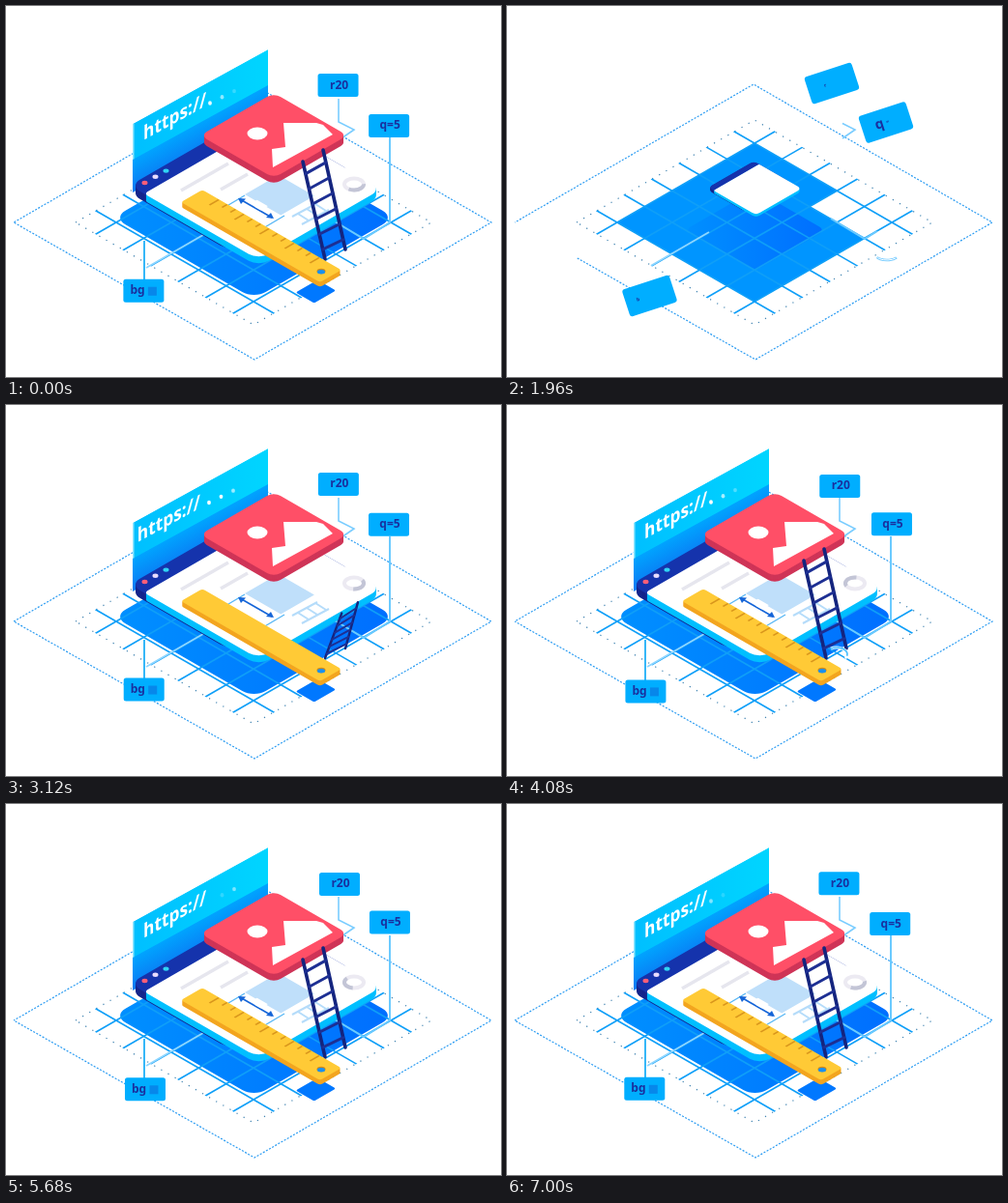
Animation, 512 px wide and 384 px high, one loop 7.04 s. Source, as an HTML page with a canvas:

```html
<!DOCTYPE html>
<html>
<head>
<meta charset="utf-8">
<style>
html, body { margin: 0; width: 100%; height: 100%; overflow: hidden; background: #fff; }
canvas { display: block; }
</style>
</head>
<body>
<canvas id="stage" width="512" height="384"></canvas>
<script>
const c = document.getElementById('stage').getContext('2d');
const LOOP = 7040, RESTART = 1400, SWAY = 2020, BLINK = 990;
const NAVY = '#1a2f9e', SKY = '#00aeff';
const FONT = '"Noto Sans", "Open Sans", sans-serif';

const clamp = x => Math.max(0, Math.min(1, x));
const lin = (t, a, b) => clamp((t - a) / (b - a));
const ease = (t, a, b) => { const p = lin(t, a, b); return p * p * (3 - 2 * p); };
const out = (t, a, b) => 1 - (1 - lin(t, a, b)) ** 3;
const mix = (a, b, p) => a + (b - a) * p;
const mixPt = (a, b, p) => [mix(a[0], b[0], p), mix(a[1], b[1], p)];

function scoped(draw) { c.save(); draw(); c.restore(); }

// Isometric floor: first axis runs down-right, second up-right.
function floor(x, y, draw) {
  scoped(() => { c.transform(.866, .5, .866, -.5, x, y); draw(); });
}

function box(x, y, w, h, r, fill) {
  c.fillStyle = fill;
  c.beginPath();
  c.roundRect(x, y, w, h, r);
  c.fill();
}

function slab(x, y, u, v, w, h, r, depth, side, top) {
  for (let d = depth; d >= 0; d--)
    floor(x, y + d, () => box(u, v, w, h, r, d ? side : top));
}

function trace(pts, close) {
  c.beginPath();
  pts.forEach(p => c.lineTo(...p));
  if (close) c.closePath();
}

function poly(pts, fill) {
  trace(pts, true);
  c.fillStyle = fill;
  c.fill();
}

// Strokes the first part p of a path.
function line(pts, color, width = 1.5, p = 1) {
  if (p <= 0) return;
  let len = 0;
  for (let i = 1; i < pts.length; i++)
    len += Math.hypot(pts[i][0] - pts[i - 1][0], pts[i][1] - pts[i - 1][1]);
  scoped(() => {
    if (p < 1) c.setLineDash([p * len, len + 1]);
    c.strokeStyle = color;
    c.lineWidth = width;
    trace(pts);
    c.stroke();
  });
}

function ellipse(x, y, rx, ry, fill) {
  c.fillStyle = fill;
  c.beginPath();
  c.ellipse(x, y, rx, ry, 0, 0, 7);
  c.fill();
}

function arc(x, y, rx, ry, from, to, color, width) {
  c.strokeStyle = color;
  c.lineWidth = width;
  c.beginPath();
  c.ellipse(x, y, rx, ry, 0, from, to);
  c.stroke();
}

function border(u) {
  const p = lin(u, 0, 600);
  if (!p) return;
  scoped(() => {
    const pts = [[8, 224], [255, 81], [502, 224], [257, 366], [8, 224]];
    const n = Math.min(4, Math.ceil(p * 4));
    const path = pts.slice(0, n);
    path.push(mixPt(pts[n - 1], pts[n], p * 4 - n + 1));
    c.setLineDash([2, 1.6]);
    c.lineDashOffset = -u / 60;
    c.strokeStyle = '#2b9cf2';
    c.lineWidth = 1.2;
    trace(path);
    c.stroke();
    if (p > .5) {
      c.setLineDash([1.2, 7]);
      c.lineDashOffset = 0;
      c.strokeStyle = '#3a7fae';
      trace([[72, 224], [256, 118], [440, 224], [256, 330]], true);
      c.stroke();
    }
  });
}

function grid(u) {
  const p = out(u, 40, 400), cell = 32.8;
  const fade = 1 - ease(u, 700, 1150);
  floor(114, 224, () => {
    c.globalAlpha = fade;
    c.fillStyle = '#0095ff';
    c.fillRect(0, 0, 3 * cell * p, 5 * cell * p);
    c.fillRect(3 * cell * p - 1, 0, 2 * cell * p + 1, 4 * cell * p);
    c.globalAlpha = 1;
  });
  // The shadow below the page spreads with it.
  const k = mix(.2, .5, out(u, 320, 560)) + .5 * ease(u, 560, 950);
  if (u > 320) {
    const s = 168 * k;
    const g = c.createLinearGradient(-s / 2, -s / 2, s / 2, s / 2);
    g.addColorStop(0, '#0090ff');
    g.addColorStop(1, '#006eff');
    floor(256.5, mix(232, 219, ease(u, 560, 950)), () => box(-s / 2, -s / 2, s, s, 14 * k, g));
  }
  floor(114, 224, () => {
    c.strokeStyle = '#0f9ff8';
    c.lineWidth = 1.9;
    const a = -.75 * cell, b = mix(a, 5.75 * cell, p);
    for (let i = 0; i < 6; i++) {
      trace([[i * cell, a], [i * cell, b]]);
      c.stroke();
      trace([[a, i * cell], [b, i * cell]]);
      c.stroke();
    }
  });
}

function connectors(u) {
  const p = lin(u, 350, 750), pale = '#8ed6ff';
  line([[209, 234], [145, 271]], pale, 1.8, out(u, 350, 700));
  line([[143, 243], [143, 285]], '#35b7f8', 2, lin(u, 650, 800));
  line([[335, 220], [370, 241], [397, 224], [397, 136]], '#6bcaff', 2, mix(0, 1, lin(u, 450, 770)));
  line([[347, 137], [360, 128], [344, 120], [344, 96]], '#7acdff', 1.6, p);
}

function panel(u) {
  const p = out(u, 900, 1400);
  if (!p) return;
  scoped(() => {
    c.transform(1, -.55, 0, 1, 131, 0);
    c.beginPath();
    c.rect(0, 190 - 68 * p, 140, 68 * p + 8);
    c.clip();
    const g = c.createLinearGradient(0, 158, 0, 190);
    g.addColorStop(0, '#00a5ff');
    g.addColorStop(1, '#0a7cf4');
    c.fillStyle = g;
    c.fillRect(0, 158, 140, 35);
    const h = c.createLinearGradient(0, 0, 140, 0);
    h.addColorStop(0, '#00bfff');
    h.addColorStop(1, '#00d5ff');
    const y = mix(190, 122, p);
    c.fillStyle = h;
    c.fillRect(0, y, 140, 37);
    c.fillStyle = '#8fe6ff';
    c.fillRect(0, y, 1.5, 37);
    c.beginPath();
    c.rect(0, y, 140, 37);
    c.clip();
    const slide = out(u, 1400, 1950);
    scoped(() => {
      c.transform(1, 0, 0, 1, mix(-75, 11, slide), 145 + y - 122);
      c.scale(.866, 1);
      c.font = 'bold 20px ' + FONT;
      c.fillStyle = '#fff';
      if (u > 1400) c.fillText('https://', 0, 0);
    });
  });
  if (u < 1450) return;
  const beat = u % BLINK, shift = mix(-14, 0, out(u, 1400, 1950));
  for (let i = 0; i < 3; i++) {
    const on = beat < 450 ? 1 - lin(beat, 210 + i * 30, 310 + i * 30)
                          : lin(beat, 600 + i * 35, 700 + i * 35);
    scoped(() => {
      c.globalAlpha = on;
      ellipse(211 + i * 12.5 + shift, 100.5 - i * 6.2 - shift * .55, 1.9, 2.2, '#fff');
    });
  }
}

function page(u) {
  const p = ease(u, 380, 900);
  if (u < 380) return;
  const k = mix(.1, .37, out(u, 380, 560)) + .63 * ease(u, 560, 900);
  scoped(() => {
    c.translate(mix(256, 261, p), 189);
    c.scale(k, k);
    slab(0, 0, -80, -73.5, 120, 147, 12, 8, '#14258c', '#1533ac');
    slab(0, 0, -63, -73.5, 137, 147, [4, 12, 12, 4], 7, '#00bfff', '#fff');
  });
  if (u < 900) return;
  ['#ff5f78', '#e8dcff', '#2fd4f5'].forEach((color, i) =>
    ellipse(143.5 + i * 11, 183 - i * 6.2, 3 * out(u, 900 + i * 60, 1100 + i * 60), 2.2, color));

  line([[181, 191], [230, 163]], '#e6e6ee', 3.5, lin(u, 1000, 1250));
  line([[222, 190], [250, 174]], '#e6e6ee', 3.5, lin(u, 1050, 1300));
  const q = out(u, 1050, 1400);
  floor(247, 195, () => box(0, 0, 43 * q, 40 * q, 0, '#bfdffa'));
  line([[225, 209], [247, 196]], '#58b7f5', 1.4, lin(u, 1250, 1500));
  line([[266, 230], [288, 217]], '#58b7f5', 1.4, lin(u, 1250, 1500));
  const a = out(u, 1300, 1600);
  if (a) {
    const from = [242, 200], to = mixPt(from, [275, 219], a), blue = '#1565d8';
    line([from, to], blue, 1.6);
    poly([[240, 199], [248, 199.5], [243, 205]], blue);
    poly([[to[0] + 2, to[1] + 1], [to[0] - 6, to[1]], [to[0] - 1, to[1] - 5]], blue);
  }
  scoped(() => {
    c.globalAlpha = lin(u, 1800, 2000);
    c.transform(.866, .5, .866, -.5, 259, 204);
    c.transform(0, -1, 1, 0, 0, 0);
    c.font = 'bold 17px ' + FONT;
    c.fillStyle = '#fff';
    c.fillText('h', -5, 10);
  });
  // Faint reflection of the ladder.
  const r = lin(u, 1500, 1720);
  line([[296, 218], [322, 204]], '#b5dcfa', 2, r);
  line([[306, 226], [334, 211]], '#b5dcfa', 2, r);
  for (let i = 0; i < 3; i++)
    line([[302 + i * 9, 215 - i * 5], [313 + i * 9, 222 - i * 5]], '#b5dcfa', 2, r);

  const turn = u / 300;
  arc(360, 184.5, 10, 6, 0, 7, '#eceaf2', 4);
  arc(360, 184.5, 10, 6, turn, turn + 2.2, '#c3c5d6', 4);
}

function card(u) {
  const p = out(u, 850, 1300);
  if (!p) return;
  scoped(() => {
    c.translate(277, 134 - 190 * (1 - p));
    slab(0, 0, -44, -44, 88, 88, 8, 7, '#cf3457', '#ff4f67');
    const s = out(u, 1200, 1500);
    ellipse(-17, -2, 10.5 * s, 6.5 * s, '#fff');
    if (s) scoped(() => {
      c.translate(0, 33);
      c.scale(s, s);
      poly([[-1, 0], [-2, -19], [12, -21], [10, -46], [44, -46], [51, -44], [61, -34]], '#fff');
    });
  });
}

function ladder(u) {
  const p = ease(u, 1560, 2020);
  if (u < 1560) return;
  const footL = [330, 262], footR = [351, 252];
  const topL = mixPt([363, 237], [307, 161], p), topR = mixPt([378, 226], [328, 149], p);
  const width = mix(2, 3.6, p);
  scoped(() => {
    c.lineCap = 'round';
    line([footL, topL], '#14247e', width);
    line([footR, topR], '#14247e', width);
    for (let i = 0; i < 6; i++) {
      const k = .1 + i * .155;
      line([mixPt(footL, topL, k), mixPt(footR, topR, k)], '#1d2f93', width * .8);
    }
  });
}

function ruler(u) {
  const p = out(u, 900, 1400);
  if (!p) return;
  const off = 1 - p;
  scoped(() => {
    c.translate(-90 * off, -250 * off);
    if (p > .95) floor(181, 222, () => box(143, -6, 22, 26, 2, '#0078ff'));
    slab(181, 203, 0, 0, 166, 25.5, 3, 5, '#f3a51f', '#ffca36');
    floor(181, 203, () => {
      for (let i = 0; i < 13; i++) {
        const h = (i % 3 ? 6 : 11) * out(u, 1760 + i * 25, 1900 + i * 25);
        line([[20 + i * 10, 25], [20 + i * 10, 25 - h]], '#d9961c', 1.6);
      }
    });
    ellipse(326, 274.5, 4.5, 2.8, '#d28a16');
    ellipse(326, 275.2, 4, 2.2, '#1a91ef');
  });
}

function swoosh(u) {
  const beat = u % SWAY;
  if (u < 1000) {
    if (u > 420 && u < 700) {
      arc(393, 257, 12, 6, .6, 2.6, '#6cc8ff', 2.5);
      arc(393, 257, 12, 6, .7, 2.5, '#fff', 1);
    }
  } else if (u > 2100 && beat > 520 && beat < 860) {
    const a = 3.3 + lin(beat, 520, 860) * 2;
    arc(341, 258, 11, 7, a, a + 2.8, '#fff', 3);
    arc(341, 258, 11, 7, a, a + 2.4, '#4cc0ff', 1.6);
  }
}

function tag(u, text, x, y, dx, dy, lead, sway) {
  const a = out(u, 130, 500), b = ease(u, 570, 900);
  if (u < 130) return;
  const w = (u - sway) / SWAY * 2 * Math.PI;
  const s = mix(1.22 * mix(.6, 1, a), 1, b);
  scoped(() => {
    c.translate(x + dx * (1 - b) + Math.cos(w) * b, y + dy * (1 - b) - 120 * (1 - a) + Math.sin(w) * b);
    c.rotate(-18 * Math.PI / 180 * (1 - b));
    c.scale(s, s);
    box(-21, -12, 42, 24, 2.5, SKY);
    c.font = 'bold 12px ' + FONT;
    c.fillStyle = NAVY;
    c.textAlign = 'center';
    c.textBaseline = 'middle';
    const square = text === 'bg';
    let left = square ? -14 : 1 - c.measureText(text).width / 2;
    [...text].forEach((ch, i) => {
      const cw = c.measureText(ch).width;
      const k = out(u, 540 + i * 90 - lead, 700 + i * 90 - lead);
      if (k) scoped(() => {
        c.translate(left + cw / 2, 0);
        c.scale(k, k);
        c.fillText(ch, 0, 0);
      });
      left += cw;
    });
    const k = square ? out(u, 720, 880) : 0;
    if (k) box(9 - 4.5 * k, .5 - 4.5 * k, 9 * k, 9 * k, 0, '#0787ea');
  });
}

function draw(now) {
  const u = (now % LOOP - RESTART + LOOP) % LOOP;
  c.fillStyle = '#fff';
  c.fillRect(0, 0, 512, 384);
  border(u);
  grid(u);
  connectors(u);
  panel(u);
  page(u);
  card(u);
  ladder(u);
  ruler(u);
  swoosh(u);
  tag(u, 'r20', 344, 83, -8, -3, 0, 240);
  tag(u, 'q=5', 397, 123.5, -5, -3, 90, 760);
  tag(u, 'bg', 143, 295.5, 4.5, 4.5, 0, 300);
}

const start = performance.now();
function tick() {
  draw(performance.now() - start);
  requestAnimationFrame(tick);
}
tick();
</script>
</body>
</html>
```
